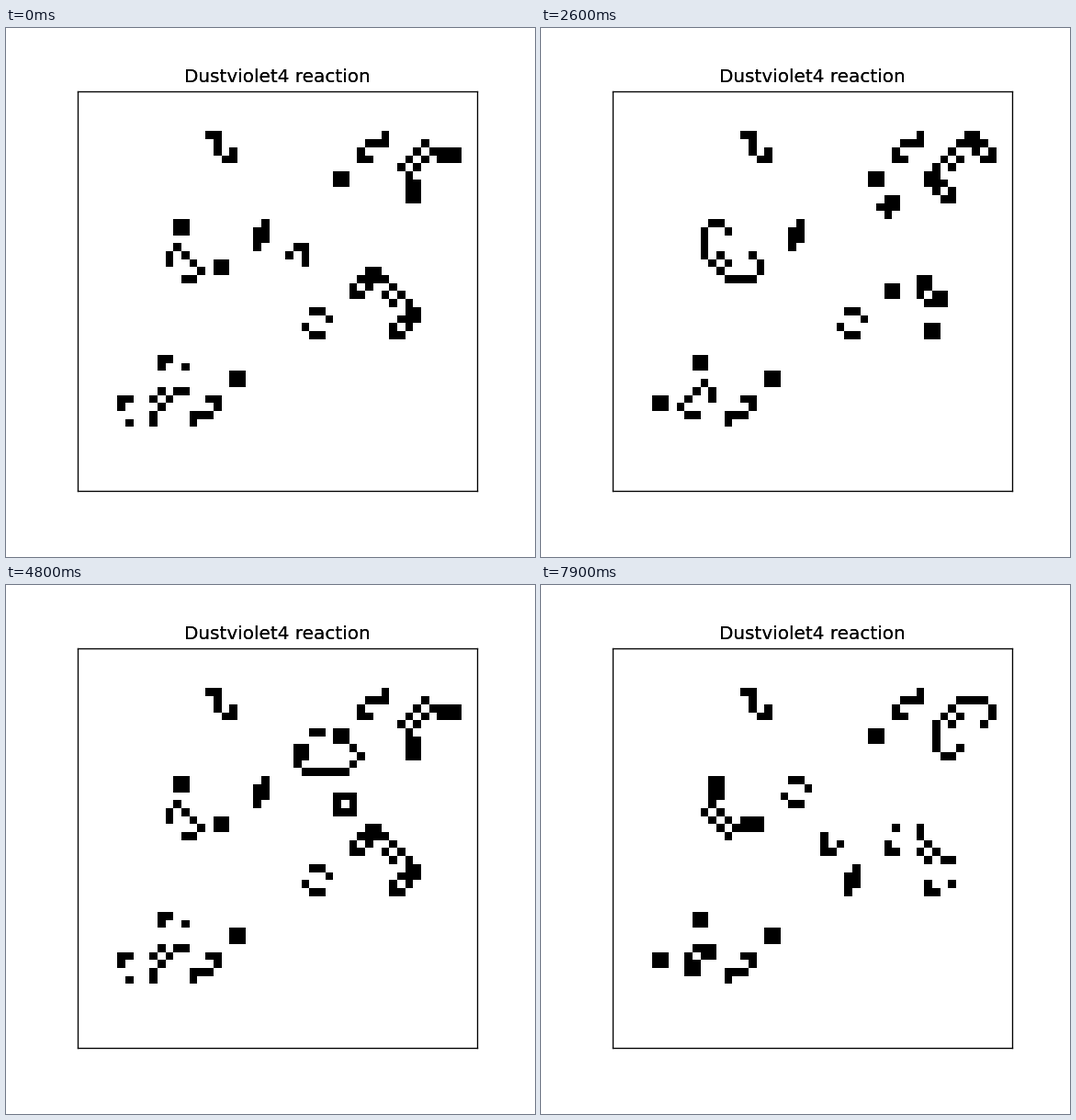
Animation, 576 px wide and 576 px high, one loop 8 s. Source, as a matplotlib script:

```python
import numpy as np
import matplotlib.pyplot as plt
from matplotlib.animation import FuncAnimation

SIZE, FRAMES = 50, 80
TITLE = "Dustviolet4 reaction"

UNIX = ".OO..... .OO..... ........ .O...... O.O..... O..O..OO ....O.OO ..OO...."
BLOCK = "OO OO"
EATER = "OO.. .O.. .O.O ..OO"
HOOK = "...O .OOO O... OO.."
TOAD = ".O OO OO O."
TOAD_OPEN = ".OO. ...O O... .OO."
GLIDER = ".OO O.O ..O"


def parse(text):
    return np.array([[ch == "O" for ch in row] for row in text.split()])


def step(cells, n=1):
    """Advance Conway's Game of Life by n generations."""
    for _ in range(n):
        near = sum(np.roll(cells.astype(int), (dr, dc), (0, 1))
                   for dr in (-1, 0, 1) for dc in (-1, 0, 1) if dr or dc)
        cells = (near == 3) | (cells & (near == 2))
    return cells


def stamp(board, cells, row, col):
    h, w = cells.shape
    board[row:row + h, col:col + w] |= cells


def start():
    board = np.zeros((SIZE, SIZE), bool)
    unix = np.pad(parse(UNIX), 2)
    # four period-6 oscillators, mirrored and out of phase
    stamp(board, unix, 14, 9)
    stamp(board, step(unix, 1)[::-1], 4, 38)
    stamp(board, step(unix, 3)[::-1, ::-1], 21, 32)
    stamp(board, step(unix, 4)[:, ::-1], 31, 3)

    stamp(board, parse(EATER), 5, 16)
    stamp(board, parse(HOOK), 5, 35)
    stamp(board, parse("..OO ...O OOO. O..."), 38, 14)
    stamp(board, parse(BLOCK), 10, 32)
    stamp(board, parse(BLOCK), 35, 19)
    stamp(board, parse(TOAD), 16, 22)
    stamp(board, parse(TOAD_OPEN), 27, 28)
    stamp(board, parse(GLIDER), 19, 26)
    return board


history = [start()]
while len(history) < FRAMES:
    history.append(step(history[-1]))

fig = plt.figure(figsize=(4.8, 4.8), dpi=120, facecolor="white")
ax = fig.add_axes([0.135, 0.125, 0.755, 0.755])
ax.set(xticks=[], yticks=[])
image = ax.imshow(history[0], cmap="binary", vmin=0, vmax=1,
                  interpolation="nearest", aspect="auto")
# drawn twice for a slightly heavier title
for _ in range(2):
    ax.annotate(TITLE, (0.5, 1), xytext=(0, 6), xycoords="axes fraction",
                textcoords="offset points", ha="center", va="baseline",
                fontsize=12, family="DejaVu Sans")


def update(i):
    image.set_data(history[i])
    return [image]


anim = FuncAnimation(fig, update, frames=FRAMES, interval=100,
                     repeat=True, repeat_delay=0)
plt.show()
```
